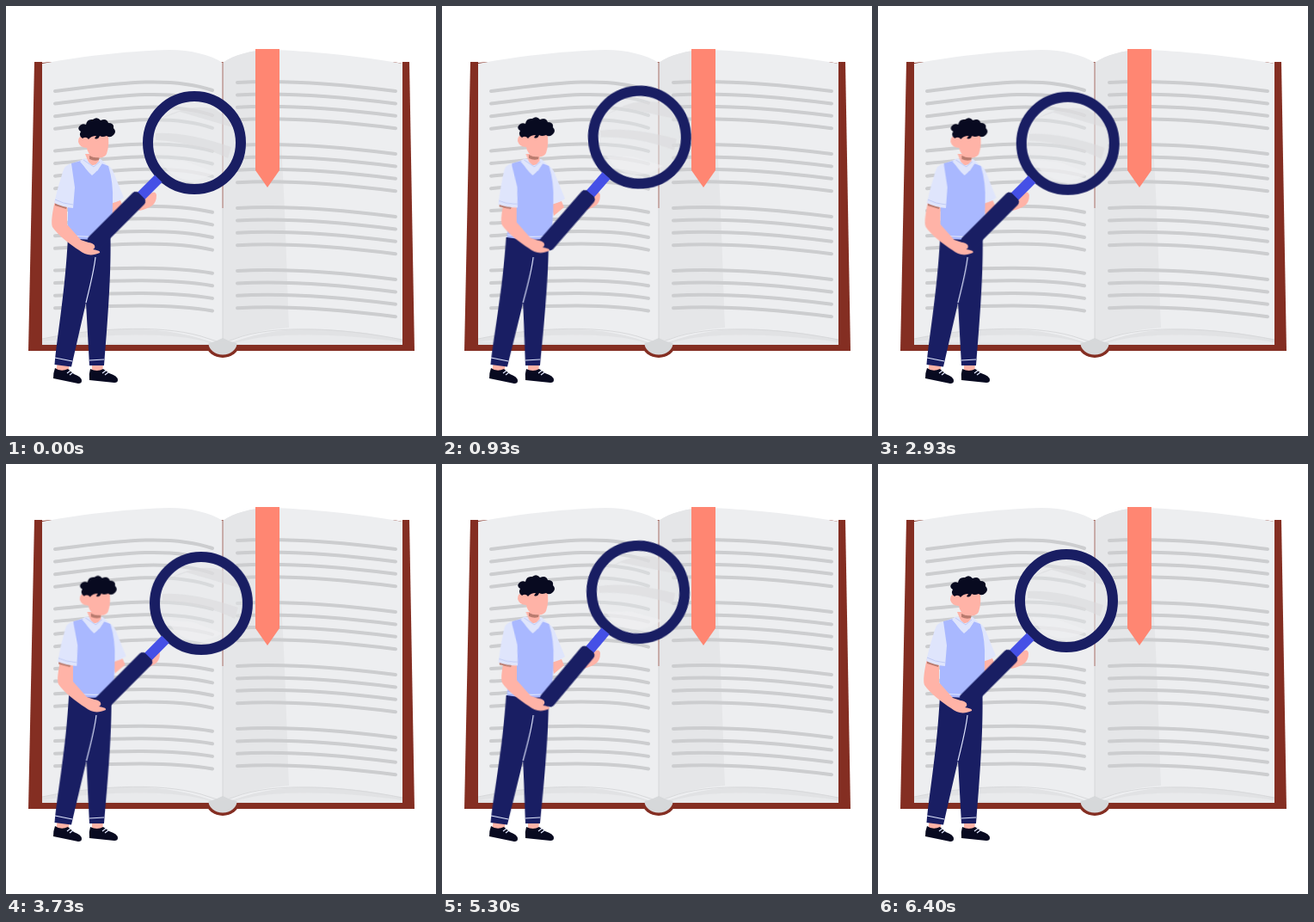
These frames come from a looping animation (500 by 500 pixels, 6460 ms). An HTML page:

```html
<!DOCTYPE html>
<html lang="en">
<head>
<meta charset="utf-8">
<title>Reader with a magnifying glass</title>
<style>
  html, body { margin: 0; width: 100%; height: 100%; overflow: hidden; background: #fff; }
  svg { display: block; width: 100%; height: 100%; }

  .lean, .tilt {
    --x: 0px; --y: 0px; --r: 0deg; --k: 0deg;
    animation: lean 3230ms cubic-bezier(.37, 0, .63, 1) infinite;
  }
  .tilt { animation-name: tilt; }
  @keyframes lean {
    0%, 2.3%, 97.2%, 100% { transform: none; }
    31.2%, 64.4% { transform: translate(var(--x), var(--y)) rotate(var(--r)) skewX(var(--k)); }
  }
  @keyframes tilt {
    0%, 13.2%, 89.8%, 100% { transform: none; }
    35.6%, 64.1% { transform: translate(var(--x), var(--y)) rotate(var(--r)); }
  }

  #legs { --k: -1deg; transform-origin: 85px 418px; }
  #torso { --x: 5.5px; }
  #head { --x: 4px; --y: -1px; }
  #sleeve { --x: 5px; --r: -6deg; transform-origin: 74px 186px; }
  #arm { --x: 16px; --y: -2.5px; }
  #far-arm { --x: 6px; --y: 1px; }
  #far-hand { --x: 9px; --y: 0px; }
  #glass { --x: 19px; --y: 8px; }
  #glass-turn { --x: -10px; --y: -18px; --r: -5deg; transform-origin: 219px 159px; }

  .cover { fill: #842e22; }
  .page { fill: #edeef0; }
  .skin { fill: #ffb3a7; }
  .shade { fill: #b97b6e; }
  .shirt { fill: #dfe5fc; }
  .vest { fill: #a9b8ff; }
  .navy { fill: #191e63; }
  .dark { fill: #080a20; }
  .trim { fill: none; stroke: #dfe5fc; stroke-width: 1.2; }
  #lines { fill: none; stroke: #cccdcf; stroke-width: 4; stroke-linecap: round; }
</style>
</head>
<body>
<svg viewBox="0 0 500 500">
  <g id="book">
    <path class="cover" d="M33 65H469L475 401H26Z"/>
    <path class="cover" d="M233 394A19 15 0 0 0 271 394Z"/>
    <path fill="#fff" d="M42 64H461V67C400 55 350 51 309 50L252 65L200 50L42 66Z"/>
    <path class="page" d="M42 67C95 57 150 52 190 51C215 51 238 57 252 66C265 57 285 51 309 51C350 52 410 58 461 67V394H42Z"/>
    <path fill="#e5e6e8" d="M252 66C265 57 285 51 309 51C322 140 325 260 329 374C300 376 272 382 252 393Z"/>
    <path fill="#e1e2e4" d="M42 387C110 373 190 368 252 396C310 368 390 373 461 388V394H42Z"/>
    <path fill="#e9eaec" d="M42 391C110 381 200 378 240 393ZM264 393C305 378 390 381 461 391V394Z"/>
    <path fill="#d6d8da" d="M235.500 392Q245 390 252 386Q259 390 268.500 392A16.500 13.500 0 0 1 235.500 392Z"/>
    <path fill="none" stroke="#d8d9db" d="M42 387C110 373 190 370 236 387L252 392L266 387C310 370 390 374 461 388"/>
    <path fill="none" stroke="#a76f66" d="M252 66V235"/>
    <path fill="none" stroke="#d5d6d8" d="M252 235V388"/>
    <path id="lines"/>
    <path fill="#ff8672" d="M290 50H318V191L304 211L290 191Z"/>
  </g>

  <g id="far-hand" class="lean">
    <path class="skin" d="M151 234L168 218Q174 214 175 220Q175 228 170 232Q164 236 155 238Z"/>
  </g>

  <g id="feet">
    <path class="skin" d="M60 414L74 416L72 427L58 425ZM100 416H113L112 427H100Z"/>
    <path class="dark" d="M57 421Q64 426 72 422L79 428Q88 431 88 436Q88 439 84 439L55 433Q55 426 57 421Z"/>
    <path class="dark" d="M98 422Q106 426 113 422L120 427Q130 430 130 435Q130 438 126 438L97 435Q96 428 98 422Z"/>
    <path class="trim" d="M71 427L75 424M74 429L78 426M112 427L116 424M115 429L119 426"/>
  </g>

  <g id="legs" class="lean">
    <path class="navy" d="M72 269H121.500C122 305 120 345 114 418H97L93 345L76 419.500L56.500 417C60 380 69 330 72 269Z"/>
    <path class="trim" d="M104 292C102 310 97 328 93 345M57 409L77 413M97 412L114 411"/>
  </g>

  <g id="far-arm" class="lean">
    <path class="skin" d="M121 229L133 226L136 233L124 243Z"/>
    <path class="shirt" d="M113 184Q121 185 124 191L137 223Q130 228 121 230Z"/>
  </g>

  <g id="torso" class="lean">
    <path class="shirt" d="M75 184L90 178H110L119 186L116 210H75Z"/>
    <path class="vest" d="M76 183L87 180Q92 190 100 197Q107 192 111 183L119 186Q125 205 124 228Q124 250 121 270Q96 274 70 269Q75 238 68 208Z"/>
    <path class="trim" d="M71 266Q96 270 121 267"/>
    <path class="skin" d="M92 172H108L108 182Q102 187 97 184Z"/>
    <path class="shirt" d="M91 177L86 181L96 192L102 187ZM109 179L112 183L106 192L102 187Z"/>
    <path fill="none" stroke="#b8c3f3" stroke-width=".8" d="M90 179L102 187L109 181"/>
  </g>

  <g id="head" class="lean">
    <path class="shade" d="M97 174Q105 178 109 175L108 179Q103 181 97 178Z"/>
    <path class="skin" d="M93 146H118Q121 160 117 172Q113 179 101 175Q95 172 94 165Q86 165 84 158Q84 150 91 152Z"/>
    <path class="dark" d="M89 154Q84 151 87 146Q82 143 86 139Q89 136 93 138Q94 131 101 132Q106 128 110 133Q117 130 119 136Q126 136 125 142Q129 146 125 150Q121 154 117 151Q112 153 109 151Q107 156 103 154L105 151Q99 151 96 155Q93 151 89 154Z"/>
  </g>

  <g id="glass" class="lean">
    <g id="glass-turn" class="tilt">
      <circle cx="219" cy="159" r="50" fill="#e7e8ea" fill-opacity=".48"/>
      <path fill="#dadbdd" fill-opacity=".6" d="M180 131Q214 112 243 120Q259 130 263 141L202 123ZM174 148Q210 146 262 164L258 177Q218 158 174 156Z"/>
      <path fill="#f0f0f2" fill-opacity=".6" d="M179 178L210 181L244 194Q211 212 188 191Z"/>
      <circle cx="219" cy="159" r="54" fill="none" stroke="#191e63" stroke-width="12"/>
      <g transform="translate(219 159) rotate(45)">
        <rect x="-6" y="59" width="12" height="32" fill="#4550e6"/>
        <rect class="navy" x="-9.500" y="87" width="19" height="82" rx="5"/>
      </g>
    </g>
  </g>

  <g id="arm" class="lean">
    <path class="skin" d="M57 226C54 240 52 252 54 257C60 266 74 277 85 284C92 290 100 291 109 287C110 284 104 284 101 283C105 281 104 276 96 275L87 272L71 254L71 232Z"/>
  </g>
  <g id="sleeve" class="lean">
    <path class="shade" d="M57 229L71 233L70 236L57 232Z"/>
    <path class="shirt" d="M76 183Q68 185 66 193Q60 211 56 229Q66 234 78 235L80 211Z"/>
    <path fill="none" stroke="#b8c3f3" stroke-width=".8" d="M57 225Q66 230 78 231"/>
  </g>
</svg>
<script>
  // Four paragraphs of four rows on each page; the bow flattens down the left page.
  let rows = "";
  for (let para = 0; para < 4; para++) {
    for (let row = 0; row < 4; row++) {
      const left = 99 + para * 69.5 + row * 14.6;
      const right = 89 + para * 73 + row * 14.4;
      const bow = 20 - para * 4.5;
      rows += `M57 ${left}C110 ${left - bow * .3} 185 ${left - bow} 240 ${left - 1 + para * 1.4}`;
      rows += `M269 ${right}C320 ${right - 3} 390 ${right + 2} 453 ${right + 10}`;
    }
  }
  document.getElementById("lines").setAttribute("d", rows);
</script>
</body>
</html>
```
